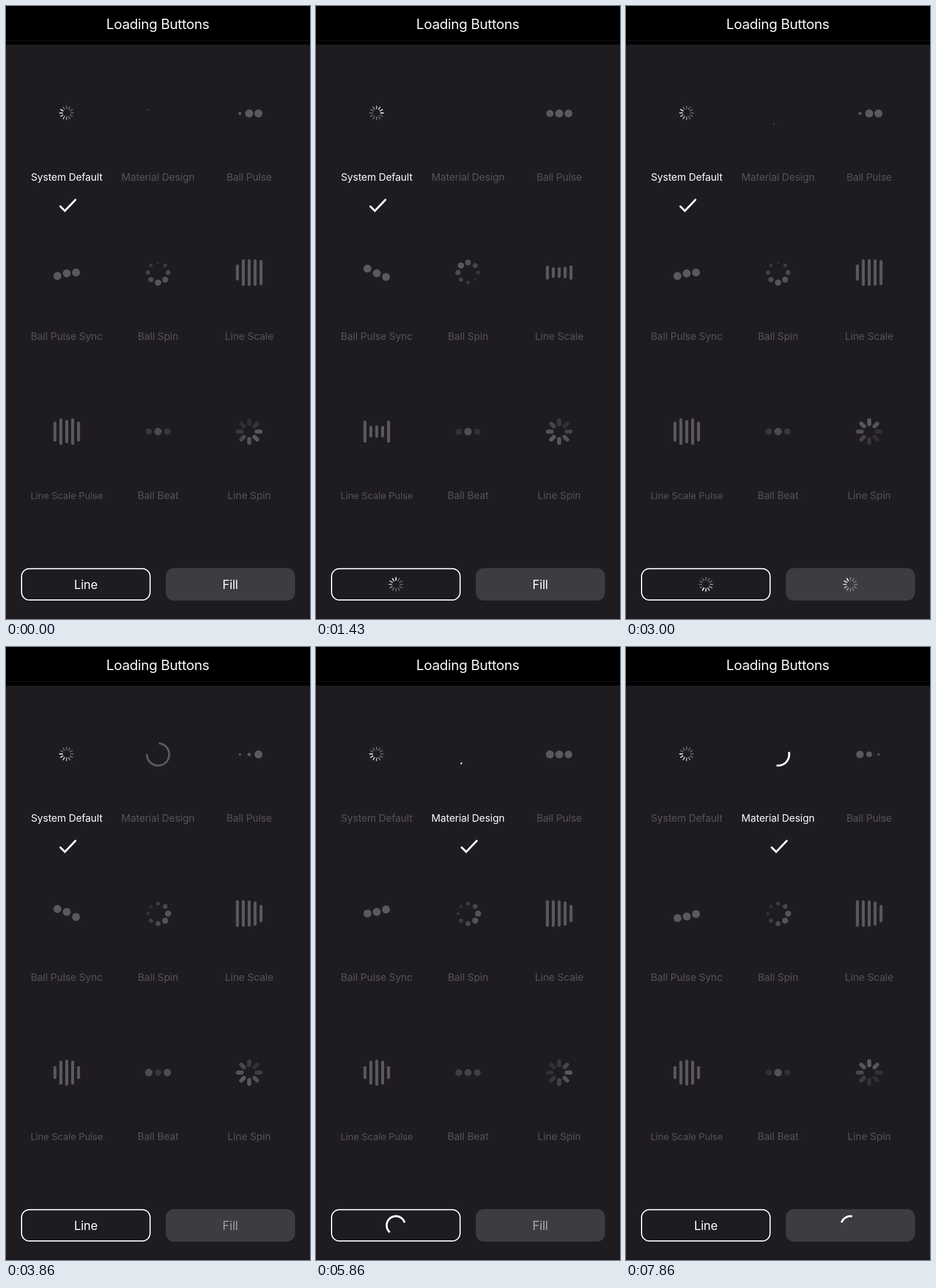
Write an HTML page with a canvas that moves like this. It is 527 px wide and 1063 px high and loops after 8 s.

```html
<!DOCTYPE html>
<html lang="en">
<head>
<meta charset="utf-8">
<title>Loading Buttons</title>
<style>
  html, body { margin: 0; width: 100%; height: 100%; overflow: hidden; background: #1f1c21; }
  canvas { display: block; width: 527px; height: 1063px; }
</style>
</head>
<body>
<canvas id="stage" width="527" height="1063"></canvas>
<script>
const ctx = document.getElementById('stage').getContext('2d');
const LOOP = 8000, FPS = 7, TAU = Math.PI * 2;
const COLS = [105.3, 263.6, 421.6], ROWS = [186.3, 462.2, 738];
const SIZE = 46, BALL = 13.8, GAP = 16.1;
const GREY = '#5b595e', LABEL = '#555358', WHITE = '#fff';
const SELECT_AT = 4.41;
const LABELS = ['System Default', 'Material Design', 'Ball Pulse', 'Ball Pulse Sync', 'Ball Spin',
  'Line Scale', 'Line Scale Pulse', 'Ball Beat', 'Line Spin'];

const mod = (a, n) => ((a % n) + n) % n;
const clamp = x => Math.min(1, Math.max(0, x));

function bezier(x1, y1, x2, y2) {
  const at = (a, b, s) => 3 * (1 - s) * (1 - s) * s * a + 3 * (1 - s) * s * s * b + s * s * s;
  return x => {
    let lo = 0, hi = 1;
    for (let i = 0; i < 24; i++) {
      const mid = (lo + hi) / 2;
      if (at(x1, x2, mid) < x) lo = mid; else hi = mid;
    }
    return at(y1, y2, lo);
  };
}
const linear = x => x;
const inOut = bezier(0.42, 0, 0.58, 1);
const snap = bezier(0.2, 0.68, 0.18, 1.08);
const pulse = bezier(0.85, 0.25, 0.37, 0.85);

// Repeating keyframes; the easing applies to each segment.
function keys(time, duration, stops, values, ease) {
  const p = mod(time / duration, 1);
  let i = 0;
  while (i < stops.length - 2 && p >= stops[i + 1]) i++;
  const x = (p - stops[i]) / (stops[i + 1] - stops[i]);
  return values[i] + (values[i + 1] - values[i]) * ease(x);
}
const dip = (time, duration, low, ease) => keys(time, duration, [0, 0.5, 1], [1, low, 1], ease);

function ball(x, y, d, alpha = 1) {
  ctx.globalAlpha = alpha;
  ctx.fillStyle = GREY;
  ctx.beginPath();
  ctx.arc(x, y, d / 2, 0, TAU);
  ctx.fill();
  ctx.globalAlpha = 1;
}

function box(x, y, w, h, r, color) {
  ctx.fillStyle = color;
  ctx.beginPath();
  ctx.roundRect(x, y, w, h, r);
  ctx.fill();
}

function text(str, x, y, size, color, spacing) {
  ctx.font = `${size}px Inter, sans-serif`;
  ctx.letterSpacing = spacing + 'px';
  ctx.textAlign = 'center';
  ctx.fillStyle = color;
  ctx.fillText(str, x + spacing / 2, y);
}

// Twelve spokes, the head stepping clockwise with a fading trail.
function spokes(x, y, head) {
  ctx.strokeStyle = WHITE;
  ctx.lineWidth = 2;
  ctx.lineCap = 'round';
  for (let i = 0; i < 12; i++) {
    const age = mod(Math.floor(head) - i, 12);
    const a = i * TAU / 12 - TAU / 4;
    ctx.globalAlpha = Math.max(0.3, 0.95 - age * 0.12);
    ctx.beginPath();
    ctx.moveTo(x + 7.2 * Math.cos(a), y + 7.2 * Math.sin(a));
    ctx.lineTo(x + 11.8 * Math.cos(a), y + 11.8 * Math.sin(a));
    ctx.stroke();
  }
  ctx.globalAlpha = 1;
}

function ring(x, y, r, time, turn, color) {
  const c = mod(time, 1.5);
  const grow = inOut(clamp(c));
  const start = 0.25 * grow + 0.75 * inOut(clamp((c - 1) / 0.5));
  ctx.strokeStyle = color;
  ctx.lineWidth = 3.5;
  ctx.lineCap = 'butt';
  ctx.beginPath();
  ctx.arc(x, y, r, turn + start * TAU, turn + grow * TAU);
  ctx.stroke();
}

function ballPulse(x, y, t) {
  for (let i = 0; i < 3; i++) {
    const s = keys(t - 0.12 * (i + 1), 0.75, [0, 0.3, 1], [1, 0.3, 1], snap);
    ball(x + (i - 1) * GAP, y, BALL * s);
  }
}

function ballSync(x, y, t) {
  for (let i = 0; i < 3; i++) {
    const dy = keys(t - 0.07 * (i + 1), 0.6, [0, 0.33, 0.66, 1], [0, 8, -8, 0], inOut);
    ball(x + (i - 1) * GAP, y + dy, BALL);
  }
}

function ballSpin(x, y, t) {
  for (let i = 0; i < 8; i++) {
    const a = i * TAU / 8, time = t - 0.12 * i;
    ball(x + 17.4 * Math.cos(a), y + 17.4 * Math.sin(a),
      11.4 * dip(time, 1, 0.4, linear), dip(time, 1, 0.3, linear));
  }
}

function bars(x, y, t, delay, ease) {
  const w = SIZE / 9;
  for (let i = 0; i < 5; i++) {
    const h = SIZE * dip(t - delay(i), 1, 0.4, ease);
    box(x + (i - 2) * 2 * w - w / 2, y - h / 2, w, h, w / 2, GREY);
  }
}

function ballBeat(x, y, t) {
  for (let i = 0; i < 3; i++) {
    const time = t - (i === 1 ? 0 : 0.35);
    ball(x + (i - 1) * GAP, y, BALL * dip(time, 0.7, 0.75, linear), dip(time, 0.7, 0.2, linear));
  }
}

function lineSpin(x, y, t) {
  for (let i = 0; i < 8; i++) {
    ctx.save();
    ctx.translate(x, y);
    ctx.rotate(i * TAU / 8);
    ctx.globalAlpha = dip(t - 0.12 * (i + 1), 1.2, 0.3, inOut);
    box(9.5, -3.5, 13.6, 7, 3.5, GREY);
    ctx.restore();
  }
}

function check(x) {
  ctx.strokeStyle = WHITE;
  ctx.lineWidth = 3.4;
  ctx.lineCap = 'round';
  ctx.lineJoin = 'miter';
  ctx.beginPath();
  ctx.moveTo(x - 12, 347.5);
  ctx.lineTo(x - 4.2, 355.3);
  ctx.lineTo(x + 14.2, 336);
  ctx.stroke();
}

// Each load lasts two seconds; the title fades out before and in after it.
function buttonContent(label, x, t, loads) {
  const y = 1003;
  let alpha = 1;
  for (const { at, draw } of loads) {
    const since = t - at;
    if (since >= 0 && since < 2) draw(x, y, since);
    alpha *= since < 0 ? clamp(-since / 0.2) : clamp((since - 2) / 0.2);
  }
  ctx.globalAlpha = alpha;
  text(label, x, 1010.7, 21, WHITE, -0.2);
  ctx.globalAlpha = 1;
}
const system = (x, y, since) => spokes(x, y, 8.4 + 12 * since);
const material = (x, y, since) => ring(x, y, 16, since, since * TAU / 4, WHITE);

function header() {
  ctx.fillStyle = '#000';
  ctx.fillRect(0, 0, 527, 67);
  ctx.fillStyle = '#151416';
  ctx.fillRect(0, 59, 527, 1);
  text('Loading Buttons', 263.2, 40, 24, '#f8f8f8', -0.4);
}

function grid(t) {
  const picked = t < SELECT_AT ? 0 : 1;
  LABELS.forEach((name, i) => {
    const size = name === 'Line Scale Pulse' ? 16.5 : 17.5;
    text(name, COLS[i % 3], ROWS[Math.floor(i / 3)] + 117, size, i === picked ? WHITE : LABEL, -0.12);
  });
  check(COLS[picked] + 0.9);

  const [a, b, c] = COLS, [top, mid, low] = ROWS;
  const run = t + 6.2;
  spokes(a - 0.3, top - 0.9, 10.8 + 12 * t);
  const since = t - SELECT_AT;
  if (picked) ring(b, top, 19.3, since, since * TAU / 4, WHITE);
  else ring(b, top, 19.3, t + 0.085, (197 + 90 * t) * TAU / 360, GREY);
  ballPulse(c, top, run);
  ballSync(a, mid, run);
  ballSpin(b, mid, run);
  bars(c, mid, run, i => 0.1 * (i + 1), snap);
  bars(a, low, run, i => 0.2 * Math.abs(i - 2), pulse);
  ballBeat(b, low, run);
  lineSpin(c, low, run);
}

function buttons(t) {
  ctx.strokeStyle = WHITE;
  ctx.lineWidth = 2;
  ctx.beginPath();
  ctx.roundRect(27, 975.7, 222.8, 54.4, 13.5);
  ctx.stroke();
  box(277, 974.8, 224, 56.2, 14, '#3e3c42');
  buttonContent('Line', 138.5, t, [{ at: 1.09, draw: system }, { at: 5.18, draw: material }]);
  buttonContent('Fill', 388.9, t, [{ at: 1.76, draw: system }, { at: 5.97, draw: material }]);
}

// The picture advances in steps of a seventh of a second, on a 10 ms clock.
function stepTime(ms) {
  let k = Math.round(ms * FPS / 1000);
  if (Math.round(k * 100 / FPS) * 10 > ms) k--;
  return k / FPS;
}

function frame() {
  const t = stepTime(performance.now() % LOOP);
  ctx.fillStyle = '#1f1c21';
  ctx.fillRect(0, 0, 527, 1063);
  header();
  grid(t);
  buttons(t);
  requestAnimationFrame(frame);
}
frame();
</script>
</body>
</html>
```
